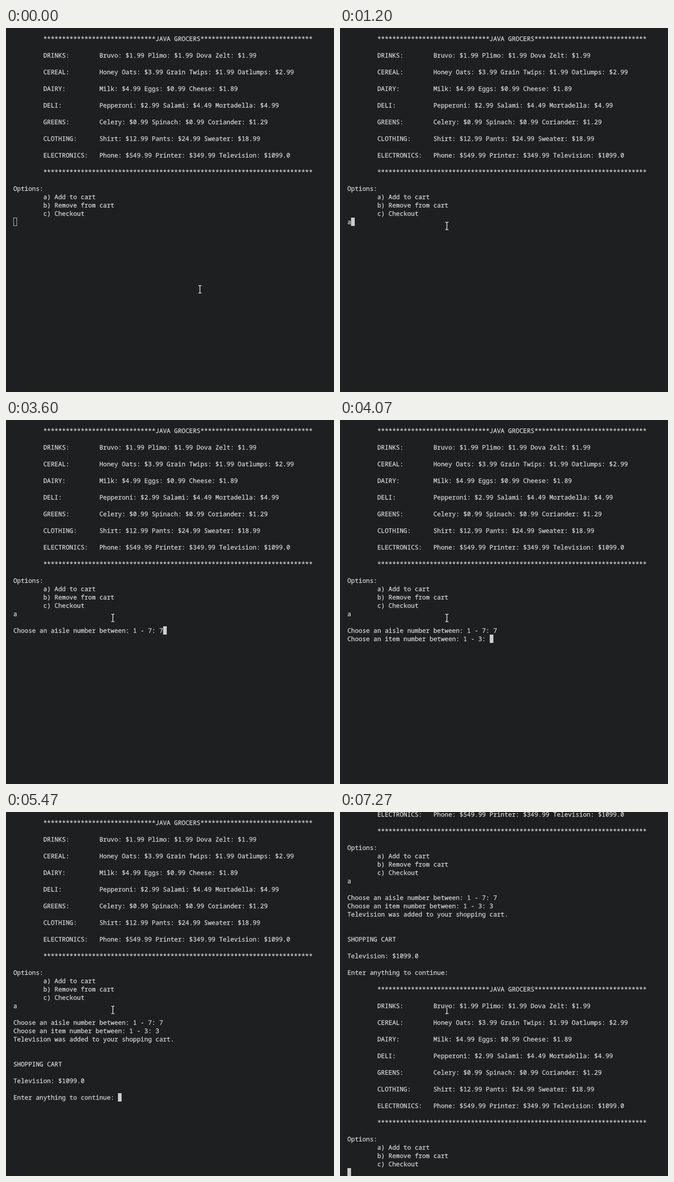
Recreate the animation shown at these times as an HTML page. Size 712 px wide and 787 px high, loop 8 s.

```html
<!DOCTYPE html>
<html lang="en">
<head>
<meta charset="utf-8">
<title>Grocery terminal</title>
<style>
  html, body { margin: 0; width: 100%; height: 100%; overflow: hidden; background: #1e1f20; }
  #stage { position: relative; width: 712px; height: 787px; overflow: hidden; background: #1e1f20; }
  #screen {
    position: absolute; left: 16px; top: 14px; margin: 0;
    font: 13.54px/18px "Noto Sans Mono", "DejaVu Sans Mono", monospace;
    font-variant-ligatures: none; text-rendering: geometricPrecision;
    color: #d4d4d4; white-space: pre;
  }
  #text { -webkit-text-stroke: 0.3px #d4d4d4; }
  #caret {
    position: absolute; left: 0; top: 0; width: 1ch; height: 18px;
    box-sizing: border-box; border: 1px solid #ccc;
  }
  #caret.focused { background: #ccc; }
  #mouse { position: absolute; left: 0; top: 0; mix-blend-mode: difference; }
</style>
</head>
<body>
<div id="stage">
  <div id="screen"><span id="text"></span><div id="caret"></div></div>
  <svg id="mouse" width="8" height="18">
    <path d="M0.5 1H3L4 2L5 1H7.5M4 2V16M0.5 17H3L4 16L5 17H7.5" fill="none" stroke="#fff" stroke-width="1.6"/>
  </svg>
</div>
<script>
const LOOP = 8000, ROW = 18, LAST_ROW = 42, FOCUS_AT = 730;
const $ = id => document.getElementById(id);
const text = $('text'), terminal = $('screen'), caret = $('caret'), mouse = $('mouse');

const indent = ' '.repeat(8);
const stars = n => '*'.repeat(n);
const aisles = [
  ['DRINKS', 'Bruvo: $1.99 Plimo: $1.99 Dova Zelt: $1.99'],
  ['CEREAL', 'Honey Oats: $3.99 Grain Twips: $1.99 Oatlumps: $2.99'],
  ['DAIRY', 'Milk: $4.99 Eggs: $0.99 Cheese: $1.89'],
  ['DELI', 'Pepperoni: $2.99 Salami: $4.49 Mortadella: $4.99'],
  ['GREENS', 'Celery: $0.99 Spinach: $0.99 Coriander: $1.29'],
  ['CLOTHING', 'Shirt: $12.99 Pants: $24.99 Sweater: $18.99'],
  ['ELECTRONICS', 'Phone: $549.99 Printer: $349.99 Television: $1099.0']
];
const menu = [
  stars(30) + 'JAVA GROCERS' + stars(30),
  ...aisles.map(([name, items]) => (name + ':').padEnd(15) + items),
  stars(72)
].map(line => indent + line + '\n\n').join('') +
  'Options:\n' +
  ['a) Add to cart', 'b) Remove from cart', 'c) Checkout'].map(line => indent + line + '\n').join('');

// Terminal output: [time, text appended]
const output = [
  [0, menu],
  [1200, 'a'],
  [1670, '\n\nChoose an aisle number between: 1 - 7: '],
  [3600, '7'],
  [4000, '\n'],
  [4070, 'Choose an item number between: 1 - 3: '],
  [5000, '3'],
  [5400, '\n'],
  [5470, 'Television was added to your shopping cart.\n\n\nSHOPPING CART\n\n' +
         'Television: $1099.0\n\nEnter anything to continue: '],
  [7200, '\n'],
  [7270, '\n' + menu]
];

// Pointer positions: [time, left, top]
const pointer = [
  [0, 417, 556],
  [70, 368, 540], [130, 266, 505], [200, 152, 467], [270, 74, 440], [330, 44, 428],
  [470, 44, 426], [530, 44, 424], [600, 44, 422], [670, 44, 419],
  [870, 92, 419], [930, 180, 419], [1000, 228, 419]
];

let shown = '';
function draw(now) {
  const t = now % LOOP;
  const log = output.filter(([at]) => at <= t).map(([, s]) => s).join('');
  if (log !== shown) {
    text.textContent = shown = log;
    const lines = log.split('\n');
    const row = lines.length - 1;
    caret.style.left = lines[row].length + 'ch';
    caret.style.top = row * ROW + 'px';
    terminal.style.top = 14 - Math.max(0, row - LAST_ROW) * ROW + 'px';
  }
  caret.classList.toggle('focused', t >= FOCUS_AT);
  const [, x, y] = pointer.filter(([at]) => at <= t).pop();
  mouse.style.left = x + 'px';
  mouse.style.top = y + 'px';
}

const start = performance.now();
function tick() {
  draw(performance.now() - start);
  requestAnimationFrame(tick);
}
tick();
</script>
</body>
</html>
```
